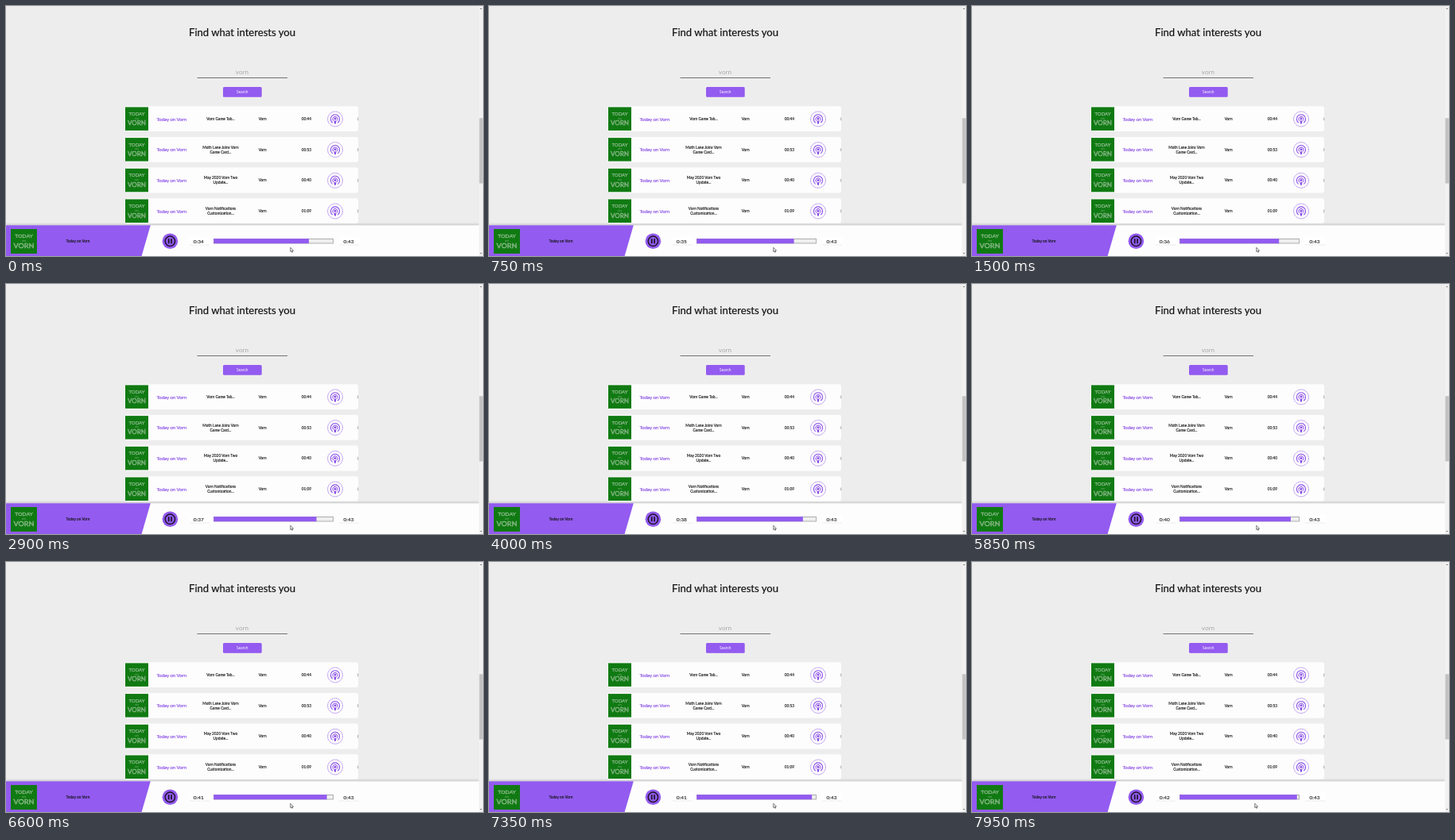
Write an HTML page that moves like this. It is 600x315 px and loops after 8000 ms.

```html
<!DOCTYPE html>
<html lang="en">
<head>
<meta charset="utf-8">
<title>Podcast search</title>
<style>
  html, body { margin: 0; width: 100%; height: 100%; overflow: hidden; background: #ededed; }
  svg { display: block; width: 100vw; height: 100vh; }
  text { font-family: Lato, sans-serif; fill: #141414; }
  .mid { text-anchor: middle; }
  .small { font-size: 4.8px; stroke: #141414; stroke-width: .12px; }
  .show { font-size: 6px; fill: #8a4fe8; stroke: #8a4fe8; stroke-width: .18px; }
  .time { font-size: 6.5px; stroke: #141414; stroke-width: .1px; }
</style>
</head>
<body>
<svg viewBox="0 0 600 315" preserveAspectRatio="none">
  <defs>
    <g id="cover">
      <rect width="29" height="29.5" fill="#107a12"/>
      <g class="mid">
        <text x="14.5" y="10.6" font-size="6" style="fill:#8fbc8f;stroke:#8fbc8f;stroke-width:.25px">TODAY</text>
        <text x="14.5" y="15.4" font-size="4" style="fill:#7fb07f">on</text>
        <text x="14.5" y="23" font-size="8" style="fill:#4e934e;stroke:#a3c7a3;stroke-width:.4px">VORN</text>
      </g>
    </g>
    <g id="podcast" fill="none" stroke="#8a4fe8">
      <circle r="9.4" stroke-width=".7" stroke-dasharray="1.3 .5"/>
      <path d="M-3.2 4.6A5.6 5.6 0 1 1 3.2 4.6" stroke-width="1.1"/>
      <path d="M-2.2 2.2A3.1 3.1 0 1 1 2.2 2.2" stroke-width="1"/>
      <circle r="1.5" cy="-.3" fill="#8a4fe8" stroke="none"/>
      <path d="M-1.5 2.2H1.5L.9 6H-.9Z" fill="#8a4fe8" stroke="none"/>
    </g>
    <filter id="soft" x="-10%" y="-30%" width="120%" height="180%">
      <feGaussianBlur stdDeviation="1.2"/>
    </filter>
  </defs>

  <rect width="600" height="315" fill="#ededed"/>
  <text class="mid" x="297" y="38.3" font-size="13.1" stroke="#141414" stroke-width=".2">Find what interests you</text>
  <text class="mid" x="297" y="85.6" font-size="8.2" style="fill:#a9a9a9">vorn</text>
  <path d="M240.5 90.5H354" stroke="#666" stroke-width=".9"/>
  <rect x="273" y="102" width="48.7" height="12.8" rx="1.5" fill="#935bf0"/>
  <text class="mid" x="297.3" y="110.2" font-size="4.9" style="fill:#fff">Search</text>

  <g id="cards"></g>

  <rect x="0" y="274.5" width="595" height="5" fill="#000" opacity=".13" filter="url(#soft)"/>
  <rect y="276.3" width="595" height="38.7" fill="#fdfdfd"/>
  <path d="M0 276.3H181.8L170.6 315H0Z" fill="#935bf0"/>
  <use href="#cover" transform="translate(6 281) scale(1.135 1.05)"/>
  <text class="small mid" x="90.5" y="297.9">Today on Vorn</text>

  <g transform="translate(206.4 296.3)">
    <circle r="9.8" fill="#935bf0"/>
    <circle r="6.2" fill="none" stroke="#1c1426" stroke-width="1.5"/>
    <path d="M-1.7-3V3M1.7-3V3" stroke="#1c1426" stroke-width="1.7"/>
  </g>

  <g fill="#fff">
    <path d="M231 300.8H256M419 300.8H444" stroke="#ddd" stroke-width=".8"/>
    <rect x="230" y="291" width="27" height="9.5" rx="1"/>
    <rect x="418" y="291" width="27" height="9.5" rx="1"/>
  </g>
  <text id="now" class="time mid" x="242.3" y="298.6">0:34</text>
  <text class="time mid" x="431" y="298.6">0:43</text>
  <rect x="261.4" y="293.4" width="150.2" height="5.6" fill="#efefef" stroke="#9b9b9b" stroke-width=".8"/>
  <rect id="bar" x="261.3" y="293.2" height="6" fill="#935bf0"/>

  <rect x="595" width="5" height="315" fill="#f1f1f1"/>
  <rect x="595.4" y="141.3" width="4.4" height="82.2" fill="#c1c1c1"/>
  <path d="M596.3 4L597.5 2.5L598.7 4ZM596.3 311L597.5 312.5L598.7 311Z" fill="#606060"/>

  <path id="cursor" d="M0 0V5.3L1.2 4.2L2 6L2.9 5.6L2.1 3.9H3.7Z" fill="#fff" stroke="#222" stroke-width=".6"/>
</svg>
<script>
  const LOOP = 8000, START = 34.55, TOTAL = 43;
  const $ = id => document.getElementById(id);
  const rows = [
    [["Vorn Game Tab..."], "00:44"],
    [["Moth Lane Joins Vorn", "Game Card..."], "00:53"],
    [["May 2020 Vorn Two", "Update..."], "00:40"],
    [["Vorn Notifications", "Customization..."], "01:09"]
  ];

  const label = (x, y, s) => `<text class="small mid" x="${x}" y="${y}">${s}</text>`;

  function card([lines, length], i) {
    const top = lines.length > 1 ? 14.9 : 17.9;
    return `<g transform="translate(0 ${126.2 + i * 38.7})">
      <rect x="149.5" width="293.5" height="31.8" rx="3" fill="#fdfdfd"/>
      <use href="#cover" x="150" y="1.2"/>
      <text class="show mid" x="208.3" y="18.5">Today on Vorn</text>
      ${lines.map((s, n) => label(270, top + n * 6, s)).join("")}
      ${label(322.7, 17.9, "Vorn")}${label(378, 17.9, length)}
      <use href="#podcast" x="414" y="16.2"/>
      <path d="M442.7 14.3V18" stroke="#777" stroke-width=".6"/>
    </g>`;
  }
  $("cards").innerHTML = rows.map(card).join("");

  function draw(ms) {
    // The player reports its position four times a second.
    const pos = Math.floor((START + ms / 1000) * 4) / 4;
    $("now").textContent = "0:" + Math.floor(pos);
    $("bar").setAttribute("width", 149.2 * pos / TOTAL);
    const slide = Math.min(1, Math.max(0, (ms - 7700) / 200));
    $("cursor").setAttribute("transform", `translate(${357.8 - 2 * slide} 304.3)`);
  }

  const t0 = performance.now();
  function tick() {
    draw((performance.now() - t0) % LOOP);
    requestAnimationFrame(tick);
  }
  tick();
</script>
</body>
</html>
```
